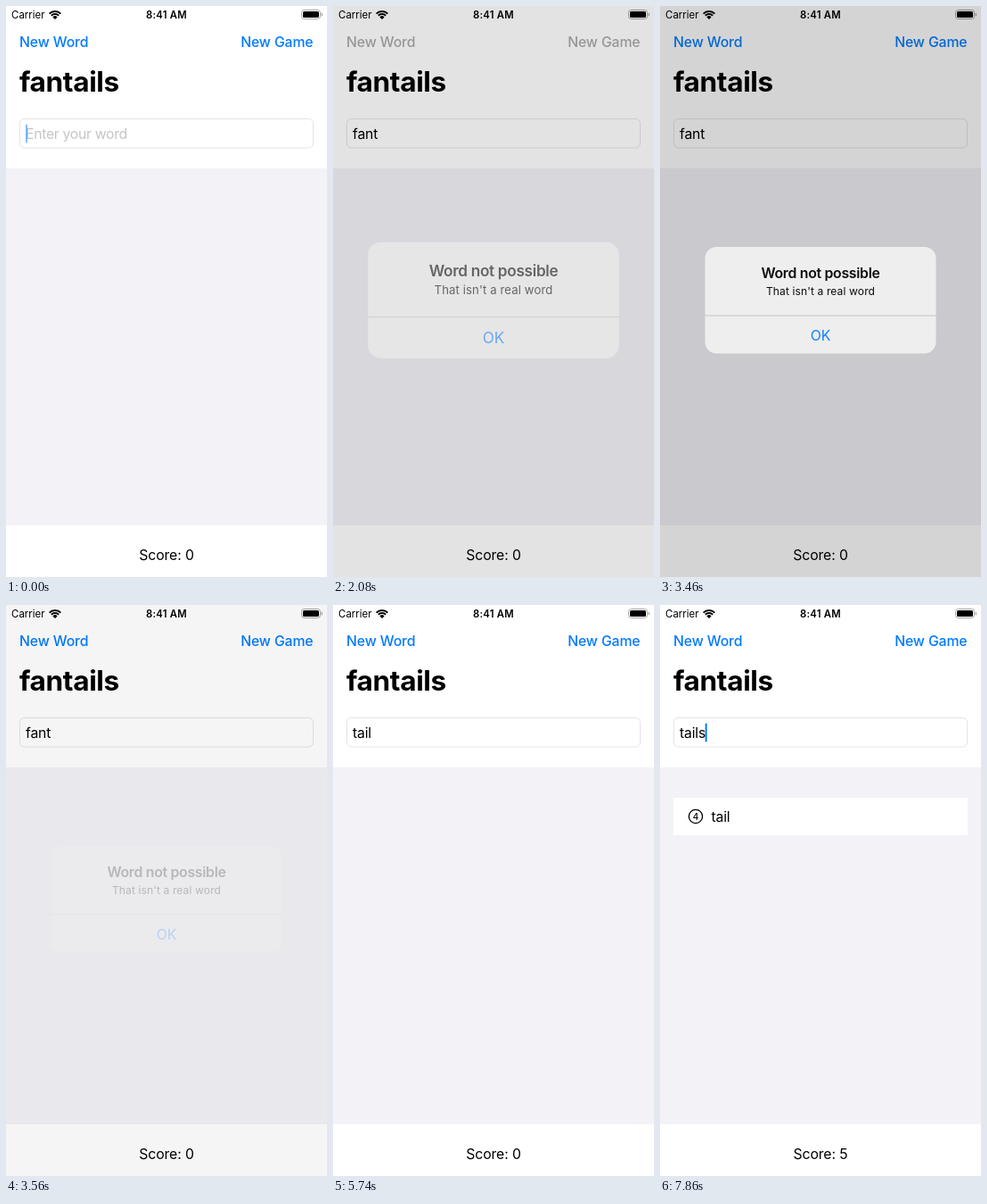
An HTML page with a canvas for the animation above (8 s loop, 360 px wide and 640 px high).

```html
<!DOCTYPE html>
<html lang="en">
<head>
<meta charset="utf-8">
<title>Word game</title>
<style>
  html, body { margin: 0; width: 100%; height: 100%; overflow: hidden; background: #fff; }
  canvas { display: block; width: 360px; height: 640px; }
</style>
</head>
<body>
<canvas id="stage"></canvas>
<script>
const W = 360, H = 640, LOOP = 8000;
const BLUE = '#007aff';
const canvas = document.getElementById('stage');
const ctx = canvas.getContext('2d');
const ratio = window.devicePixelRatio || 1;
canvas.width = W * ratio;
canvas.height = H * ratio;

// Each entry: start time, then what holds until the next entry.
const typing = [
  { at: 0, text: '', caret: 0.5 },
  { at: 290, text: '', caret: 0.2 },
  { at: 400, text: '', caret: 0 },
  { at: 940, text: '', caret: 0.6 },
  { at: 1060, text: 'f', caret: 1 },
  { at: 1190, text: 'fa', caret: 1 },
  { at: 1390, text: 'fan', caret: 1 },
  { at: 1600, text: 'fant', caret: 1 },
  { at: 1960, text: 'fant', caret: 0 },
  { at: 4160, text: 'fant', caret: 0, selected: true },
  { at: 4400, text: 't', caret: 1 },
  { at: 4620, text: 'ta', caret: 1 },
  { at: 4840, text: 'tai', caret: 1 },
  { at: 5080, text: 'tail', caret: 1 },
  { at: 5740, text: 'tail', caret: 0 },
  { at: 6920, text: '', caret: 1 },
  { at: 7210, text: 't', caret: 1 },
  { at: 7500, text: 'ta', caret: 1 },
  { at: 7750, text: 'tail', caret: 1 },
  { at: 7860, text: 'tails', caret: 1 }
];

const alerts = [
  { at: 0, opacity: 0, scale: 1, dim: 0, tint: BLUE },
  { at: 2080, opacity: 0.56, scale: 1.087, dim: 0.11, tint: '#a8a8a8' },
  { at: 2190, opacity: 0.86, scale: 1.035, dim: 0.165, tint: '#a8a8a8' },
  { at: 2290, opacity: 0.97, scale: 1.01, dim: 0.19, tint: '#a8a8a8' },
  { at: 2390, opacity: 1, scale: 1, dim: 0.2, tint: '#a8a8a8' },
  { at: 3350, opacity: 1, scale: 1, dim: 0.2, tint: '#5492d4' },
  { at: 3460, opacity: 0.95, scale: 1, dim: 0.17, tint: BLUE },
  { at: 3560, opacity: 0.22, scale: 1, dim: 0.04, tint: BLUE },
  { at: 3660, opacity: 0.04, scale: 1, dim: 0.008, tint: BLUE },
  { at: 3770, opacity: 0, scale: 1, dim: 0, tint: BLUE }
];

const stateAt = (list, t) => list.filter(s => s.at <= t).pop();

function setFont(size, weight, tracking) {
  ctx.font = `${weight} ${size}px Inter, sans-serif`;
  ctx.letterSpacing = `${size * tracking}px`;
}

function label(str, x, y, { size = 15.8, weight = 400, color = '#000', align = 'left', tracking = -0.012 } = {}) {
  setFont(size, weight, tracking);
  ctx.textAlign = align;
  ctx.fillStyle = color;
  ctx.fillText(str, x, y);
}

function box(x, y, w, h, r) {
  ctx.beginPath();
  ctx.roundRect(x, y, w, h, r);
}

function fillBox(x, y, w, h, r, color) {
  box(x, y, w, h, r);
  ctx.fillStyle = color;
  ctx.fill();
}

function strokeBox(x, y, w, h, r, color) {
  box(x, y, w, h, r);
  ctx.strokeStyle = color;
  ctx.lineWidth = 1;
  ctx.stroke();
}

function drawWifi(x, y) {
  const from = -Math.PI * 0.75, to = -Math.PI * 0.25;
  ctx.strokeStyle = ctx.fillStyle = '#000';
  ctx.lineWidth = 2;
  for (const r of [9, 5.9]) {
    ctx.beginPath();
    ctx.arc(x, y, r, from, to);
    ctx.stroke();
  }
  ctx.beginPath();
  ctx.moveTo(x, y);
  ctx.arc(x, y, 3.7, from, to);
  ctx.fill();
}

function drawStatusBar() {
  label('Carrier', 6, 14, { size: 11.5, tracking: 0 });
  drawWifi(55, 15);
  label('8:41 AM', 180, 14, { size: 11.3, weight: 600, align: 'center', tracking: 0.02 });
  strokeBox(331.5, 4.5, 21, 10, 3, '#a6a6a6');
  fillBox(333, 6, 18, 7, 1.6, '#000');
  fillBox(353.6, 7.8, 1.3, 3.6, 0.6, '#a6a6a6');
}

function drawField({ text, caret, selected }) {
  strokeBox(15.5, 126.5, 329, 32.5, 5, '#e4e4e5');
  setFont(15.8, 400, -0.012);
  const end = 22 + ctx.measureText(text).width;
  if (selected) fillBox(22, 133, end - 22, 20, 0, '#cce4ff');
  if (text) label(text, 22, 149);
  else label('Enter your word', 22, 149, { color: '#c5c5c7', tracking: -0.02 });
  if (caret) {
    ctx.globalAlpha = caret;
    fillBox(end - (text ? 0.5 : 0), 132.5, 2, 21, 1, BLUE);
    ctx.globalAlpha = 1;
  }
}

function drawRow() {
  fillBox(15, 216, 330, 42, 0, '#fff');
  ctx.beginPath();
  ctx.arc(40, 237, 7.6, 0, Math.PI * 2);
  ctx.strokeStyle = '#000';
  ctx.lineWidth = 1.3;
  ctx.stroke();
  label('4', 40, 240.6, { size: 10, weight: 500, align: 'center', tracking: 0 });
  label('tail', 57.5, 243);
}

function drawAlert({ opacity, scale }) {
  ctx.save();
  ctx.globalAlpha = opacity;
  ctx.translate(180, 329.8);
  ctx.scale(scale, scale);
  ctx.translate(-180, -329.8);
  fillBox(50.5, 270, 259, 119.5, 13, '#f1f1f1');
  label('Word not possible', 180, 305, { weight: 600, align: 'center', tracking: -0.0175 });
  label("That isn't a real word", 180, 324, { size: 12.1, align: 'center', tracking: 0.008 });
  fillBox(50.5, 346.6, 259, 0.8, 0, '#bdbdbf');
  label('OK', 180, 374.5, { color: BLUE, align: 'center' });
  ctx.restore();
}

function draw(t) {
  const alert = stateAt(alerts, t);
  const scored = t >= 6920;
  ctx.setTransform(ratio, 0, 0, ratio, 0, 0);
  fillBox(0, 0, W, H, 0, '#fff');
  fillBox(0, 182, W, 400, 0, '#f2f2f7');

  drawStatusBar();
  const nav = { weight: 500, color: alert.tint, tracking: -0.008 };
  label('New Word', 15, 46, nav);
  label('New Game', 344.5, 46, { ...nav, align: 'right' });
  label('fantails', 15, 96, { size: 31.6, weight: 700 });
  drawField(stateAt(typing, t));
  if (scored) drawRow();
  label(`Score: ${scored ? 5 : 0}`, 180, 620.5, { align: 'center', tracking: -0.008 });

  if (alert.opacity) {
    fillBox(0, 0, W, H, 0, `rgba(0, 0, 0, ${alert.dim})`);
    drawAlert(alert);
  }
}

const start = performance.now();
function tick() {
  draw((performance.now() - start) % LOOP);
  requestAnimationFrame(tick);
}
tick();
</script>
</body>
</html>
```
